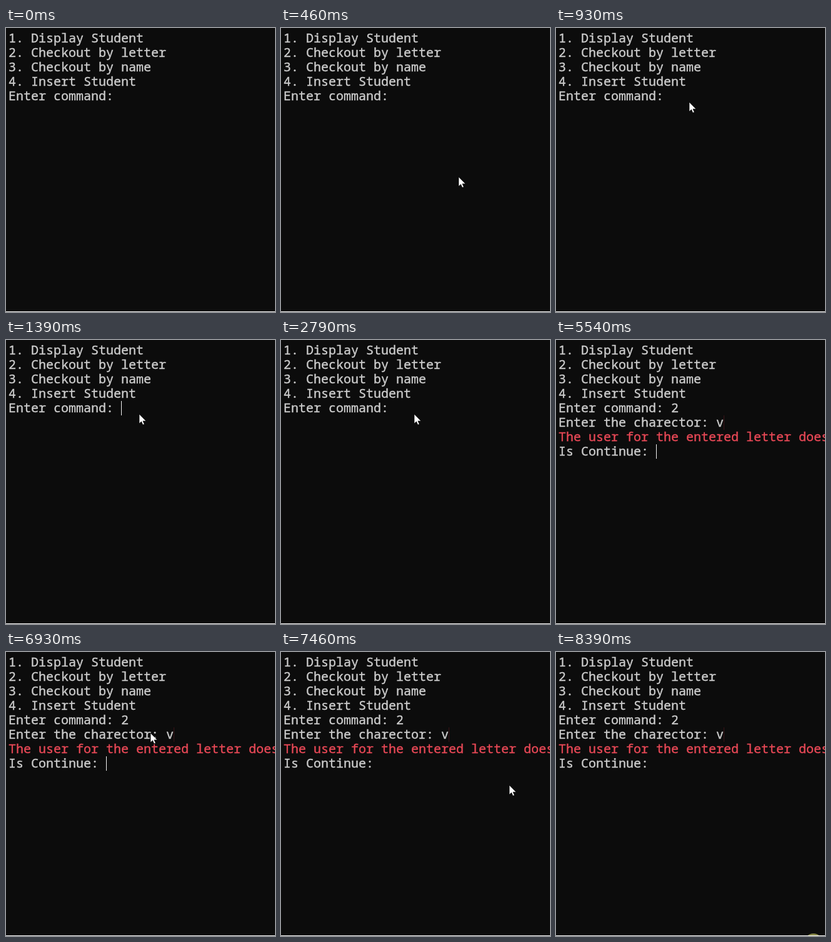
Recreate the animation shown at these times as an HTML page. Size 430 by 452 pixels, loop 8650 ms.

```html
<!DOCTYPE html>
<html lang="en">
<head>
<meta charset="utf-8">
<title>Student console</title>
<style>
  html, body { margin: 0; width: 100%; height: 100%; overflow: hidden; background: #0c0c0c; }
  svg { display: block; width: 430px; height: 452px; }
  text { font: 20px "Noto Sans Mono", "DejaVu Sans Mono", monospace; white-space: pre;
         fill: #ccc; stroke: #ccc; stroke-width: .4px; }
  .error { fill: #e74856; stroke: #e74856; }
</style>
</head>
<body>
<svg viewBox="0 0 430 452">
  <rect width="430" height="452" fill="#0c0c0c"/>
  <g id="lines"></g>
  <rect id="ghost" x="268" y="120" width="1" height="23" fill="#3a1418"/>
  <rect id="caret" width="1" height="23" fill="#f2f2f2"/>
  <circle id="click" r="15" fill="#ffff80" fill-opacity=".5"/>
  <rect y="451" width="430" height="1" fill="#fff"/>
  <path id="pointer" fill="#fff" stroke="#000" stroke-width=".6"
        d="M0 0V15L3.4 11.8 5.8 17 8.2 16 5.9 10.9H10.8Z"/>
</svg>
<script>
const LOOP = 8650, TICK = 1000 / 15, BLINK = 545;
const CELL = 12, LINE = 23, LEFT = 4, TOP = 5;
const ERROR_ROW = 6, ERROR_TIME = 5540;
const $ = id => document.getElementById(id);

const menu = "1. Display Student\n2. Checkout by letter\n3. Checkout by name\n4. Insert Student\nEnter command: ";

// Console output in order; "wake" is when the caret starts blinking afresh
const log = [
  { at: 0, text: menu },
  { at: 1130, text: "", wake: 1130 },
  { at: 3400, text: "2", wake: 3400 },
  { at: 3670, text: "\nEnter the charector: ", wake: 3780 },
  { at: 5070, text: "v", wake: 5070 },
  { at: ERROR_TIME, text: "\nThe user for the entered letter does not exist\nIs Continue: ", wake: 5650 }
];

const linear = k => k;
const easeOut = k => 1 - (1 - k) ** 2;

// Each leg moves the pointer, which then rests until it is hidden
const legs = [
  { from: 200, to: 930, until: 3470, start: [389, 414], end: [213, 118], ease: easeOut },
  { from: 6860, to: 7466, until: 7466, start: [213, 118], end: [365, 211], ease: linear },
  { from: 7466, to: 7720, until: 7790, start: [365, 211], end: [391, 425], ease: linear }
];

const clicks = [
  { from: 1130, until: 1390, at: [212, 116] },
  { from: 8390, until: LOOP, at: [411.5, 463] }
];

const activeAt = (spans, t) => spans.find(s => t >= s.from && t < s.until);

const texts = Array.from({ length: 8 }, (_, row) => {
  const node = document.createElementNS("http://www.w3.org/2000/svg", "text");
  node.setAttribute("x", LEFT);
  node.setAttribute("y", 23 + LINE * row);
  if (row === ERROR_ROW) node.setAttribute("class", "error");
  return $("lines").appendChild(node);
});

function place(id, position) {
  $(id).style.display = position ? "" : "none";
  if (position) $(id).setAttribute("transform", `translate(${position})`);
}

function pointerAt(t) {
  // The pointer is sampled fifteen times a second
  const sampled = Math.floor((t + 7) / TICK) * TICK;
  const leg = activeAt(legs, sampled);
  if (!leg) return null;
  const k = leg.ease(Math.min(1, (sampled - leg.from) / (leg.to - leg.from)));
  return leg.start.map((v, i) => Math.round(v + (leg.end[i] - v) * k));
}

function draw(t) {
  const shown = log.filter(entry => entry.at <= t);
  const lines = shown.map(entry => entry.text).join("").split("\n");
  texts.forEach((node, row) => {
    const line = lines[row] ?? "";
    if (node.textContent !== line) node.textContent = line;
  });

  const { wake } = shown.at(-1);
  const lit = wake !== undefined && Math.floor(Math.max(0, t - wake) / BLINK) % 2 === 0;
  const row = lines.length - 1;
  place("caret", lit ? [LEFT + CELL * lines[row].length, TOP + LINE * row] : null);

  place("click", activeAt(clicks, t)?.at);
  place("pointer", pointerAt(t));
  $("ghost").style.display = t >= ERROR_TIME ? "" : "none";
}

const start = performance.now();
function frame() {
  draw((performance.now() - start) % LOOP);
  requestAnimationFrame(frame);
}
frame();
</script>
</body>
</html>
```
